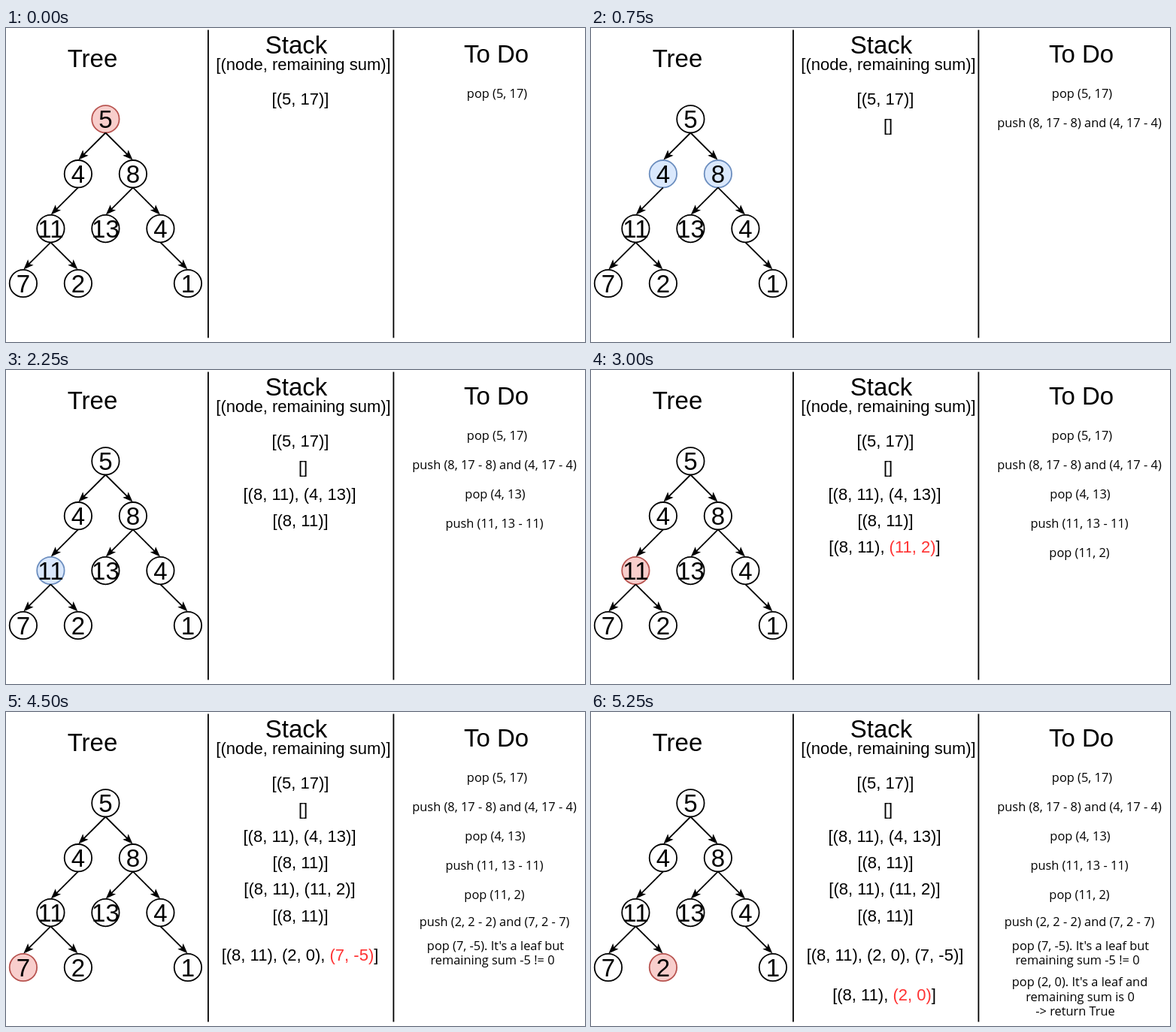
Recreate the animation shown at these times as an HTML page with a canvas. Size 770x418 px, loop 6 s.

```html
<!DOCTYPE html>
<html lang="en">
<head>
<meta charset="utf-8">
<title>Path sum with a stack</title>
<style>
html, body { margin: 0; width: 100%; height: 100%; overflow: hidden; background: #fff; }
canvas { display: block; width: 770px; height: 418px; }
</style>
</head>
<body>
<canvas id="stage"></canvas>
<script>
const WIDTH = 770, HEIGHT = 418, STEP_MS = 750;
const SANS = '"Liberation Sans", Arial, sans-serif';
const NOTE = '500 16.4px "Open Sans", sans-serif';
const RADIUS = 18.2, LINE = 1.8;
const RED = { fill: '#f8cecc', stroke: '#b85450' };
const BLUE = { fill: '#dae8fc', stroke: '#6c8ebf' };
const PLAIN = { fill: '#fff', stroke: '#000' };

// Column in half steps from the leftmost node, level from the root.
const nodes = [
  ['5', 3, 0], ['4', 2, 1], ['8', 4, 1], ['11', 1, 2], ['13', 3, 2],
  ['4', 5, 2], ['7', 0, 3], ['2', 2, 3], ['1', 6, 3]
].map(([label, col, level]) => ({ label, x: 22.9 + col * 36.5, y: 121.3 + level * 72.9 }));
const edges = [[0, 1], [0, 2], [1, 3], [2, 4], [2, 5], [3, 6], [3, 7], [5, 8]];

// Each step adds one row; `fresh` is drawn red while its row is the newest.
const steps = [
  { marked: [0], style: RED, stack: '[(5, 17)]', x: 391.5, y: 102,
    todo: [['pop (5, 17)', 653, 93]] },
  { marked: [1, 2], style: BLUE, stack: '[]', x: 395, y: 137,
    todo: [['push (8, 17 - 8) and (4, 17 - 4)', 649.5, 132]] },
  { marked: [1], style: RED, stack: '[(8, 11), (4, 13)]', fresh: '(4, 13)', x: 390.5, y: 173,
    todo: [['pop (4, 13)', 650.5, 171]] },
  { marked: [3], style: BLUE, stack: '[(8, 11)]', x: 391.5, y: 208,
    todo: [['push (11, 13 - 11)', 649.5, 210]] },
  { marked: [3], style: RED, stack: '[(8, 11), (11, 2)]', fresh: '(11, 2)', x: 390.5, y: 243,
    todo: [['pop (11, 2)', 649.5, 249]] },
  { marked: [6, 7], style: BLUE, stack: '[(8, 11)]', x: 391.5, y: 279,
    todo: [['push (2, 2 - 2) and (7, 2 - 7)', 649.5, 285]] },
  { marked: [6], style: RED, stack: '[(8, 11), (2, 0), (7, -5)]', fresh: '(7, -5)', x: 391, y: 331,
    todo: [["pop (7, -5). It's a leaf but", 651, 317], ['remaining sum -5 != 0', 647, 336]] },
  { marked: [7], style: RED, stack: '[(8, 11), (2, 0)]', fresh: '(2, 0)', x: 390, y: 384,
    todo: [["pop (2, 0). It's a leaf and", 650, 365], ['remaining sum is 0', 650.5, 385],
      ['-> return True', 644, 404]] }
];

const canvas = document.getElementById('stage');
const ctx = canvas.getContext('2d');
const ratio = window.devicePixelRatio || 1;
canvas.width = WIDTH * ratio;
canvas.height = HEIGHT * ratio;
ctx.scale(ratio, ratio);

function text(str, x, y, font, color = '#000', align = 'center') {
  ctx.font = font;
  ctx.fillStyle = color;
  ctx.textAlign = align;
  ctx.fillText(str, x, y);
}

function line(x1, y1, x2, y2) {
  ctx.beginPath();
  ctx.moveTo(x1, y1);
  ctx.lineTo(x2, y2);
  ctx.stroke();
}

function drawArrow(from, to) {
  const dx = to.x - from.x, dy = to.y - from.y - 2 * RADIUS;
  const tip = Math.hypot(dx, dy) - 2;
  ctx.save();
  ctx.translate(from.x, from.y + RADIUS);
  ctx.rotate(Math.atan2(dy, dx));
  ctx.fillStyle = ctx.strokeStyle = '#000';
  ctx.lineWidth = LINE;
  line(0, 0, tip - 8, 0);
  ctx.beginPath();
  ctx.moveTo(tip, 0);
  ctx.lineTo(tip - 11, 4.2);
  ctx.lineTo(tip - 8.5, 0);
  ctx.lineTo(tip - 11, -4.2);
  ctx.closePath();
  ctx.fill();
  ctx.lineWidth = 1;
  ctx.stroke();
  ctx.restore();
}

function drawNode({ label, x, y }, style) {
  ctx.beginPath();
  ctx.arc(x, y, RADIUS, 0, Math.PI * 2);
  ctx.fillStyle = style.fill;
  ctx.fill();
  ctx.strokeStyle = style.stroke;
  ctx.lineWidth = LINE;
  ctx.stroke();
  text(label, x, y + 12, `33px ${SANS}`);
}

function drawStack({ stack, fresh, x, y }, newest) {
  const font = `22px ${SANS}`;
  if (!newest || !fresh) return text(stack, x, y, font);
  ctx.font = font;
  let left = x - ctx.measureText(stack).width / 2;
  const head = stack.slice(0, stack.lastIndexOf(fresh));
  for (const [part, color] of [[head, '#000'], [fresh, '#ff3333'], [']', '#000']]) {
    text(part, left, y, font, color, 'left');
    left += ctx.measureText(part).width;
  }
}

function draw(current) {
  ctx.fillStyle = '#fff';
  ctx.fillRect(0, 0, WIDTH, HEIGHT);

  ctx.strokeStyle = '#000';
  ctx.lineWidth = LINE;
  line(268.9, 2.5, 268.9, 412.5);
  line(515.4, 2.5, 515.4, 412.5);

  const title = `33px ${SANS}`;
  text('Tree', 115, 52, title);
  text('Stack', 386, 34, title);
  text('To Do', 652, 46, title);
  text('[(node, remaining sum)]', 395.5, 56, `22px ${SANS}`);

  const { marked, style } = steps[current];
  nodes.forEach((node, i) => drawNode(node, marked.includes(i) ? style : PLAIN));
  edges.forEach(([a, b]) => drawArrow(nodes[a], nodes[b]));

  steps.slice(0, current + 1).forEach((step, i) => {
    drawStack(step, i === current);
    for (const [str, x, y] of step.todo) text(str, x, y, NOTE);
  });
}

const start = performance.now();
function tick() {
  const elapsed = performance.now() - start;
  draw(Math.floor(elapsed / STEP_MS) % steps.length);
  requestAnimationFrame(tick);
}
tick();
</script>
</body>
</html>
```
